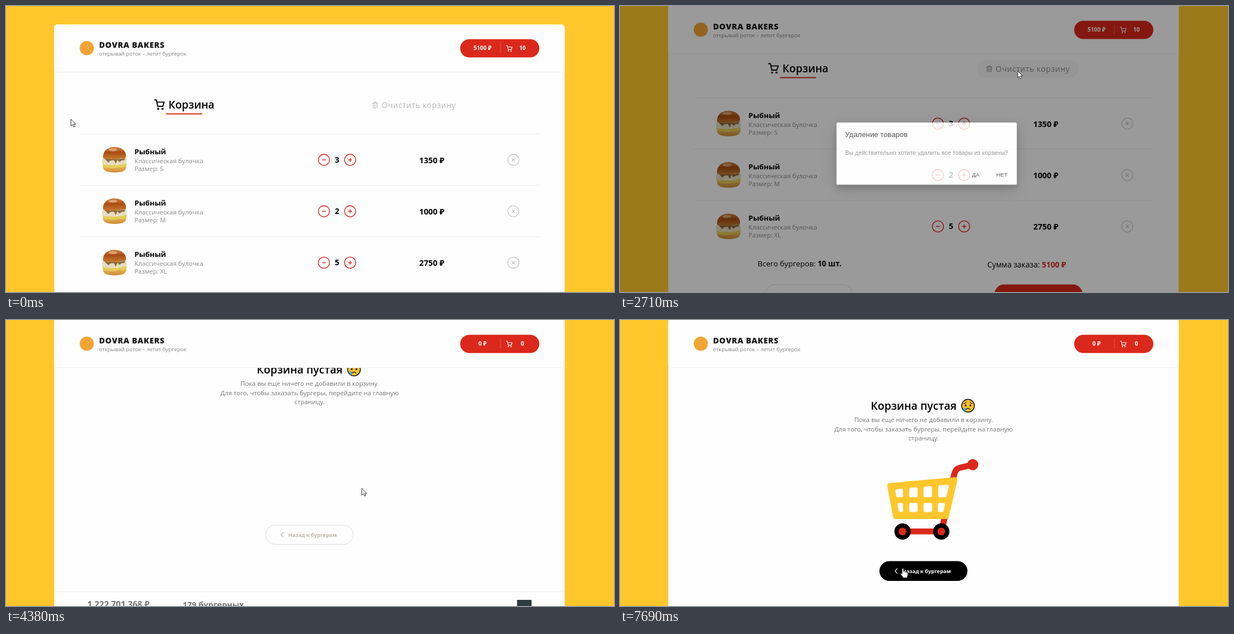
An HTML page that plays this animation: 1091 by 513 pixels, repeating every 8000 ms.

```html
<!DOCTYPE html>
<html lang="ru">
<head>
<meta charset="utf-8">
<style>
  html, body { margin: 0; width: 100%; height: 100%; overflow: hidden; background: #ffc72c; }
  svg { display: block; width: 1091px; height: 513px; font-family: "Open Sans", "Noto Sans", sans-serif; }
  text { white-space: pre; }
  .b { font-weight: 700; }
  .mid { text-anchor: middle; }
  .line { fill: none; stroke-linecap: round; stroke-linejoin: round; }
  #dialog { font-family: "Liberation Sans", Arial, sans-serif; }
  #panel { filter: drop-shadow(0 7px 5px rgba(0,0,0,.2)) drop-shadow(0 6px 15px rgba(0,0,0,.22)); }
</style>
</head>
<body>
<svg id="stage" viewBox="0 0 1091 513"></svg>
<script>
const RED = '#da291c', YELLOW = '#ffc72c', PAPER = '#fefefe';
const $ = id => document.getElementById(id);

// Drawing helpers
const text = (x, y, size, fill, str, cls = '', extra = '') =>
  `<text x="${x}" y="${y}" font-size="${size}" fill="${fill}" class="${cls}" ${extra}>${str}</text>`;
const rect = (x, y, w, h, r, fill, extra = '') =>
  `<rect x="${x}" y="${y}" width="${w}" height="${h}" rx="${r}" fill="${fill}" ${extra}/>`;
const disc = (x, y, r, fill, extra = '') => `<circle cx="${x}" cy="${y}" r="${r}" fill="${fill}" ${extra}/>`;
const line = (d, color, width, extra = '') =>
  `<path class="line" d="${d}" stroke="${color}" stroke-width="${width}" ${extra}/>`;
const group = (x, y, body, extra = '') => `<g transform="translate(${x} ${y})" ${extra}>${body}</g>`;

const trolley = (x, y, scale, color) => `<g transform="translate(${x} ${y}) scale(${scale})">
  ${line('M1 1h3.3l2.4 11.2h8.9L18 4.8H5.2', color, 1.9)}
  ${disc(7.5, 16.5, 1.8, color)}${disc(15, 16.5, 1.8, color)}</g>`;

const burger = `
  <path d="M2 34Q22 40 44 33Q45 42 37 45Q23 48.500 9 45Q1 42 2 34Z" fill="url(#base)"/>
  <path d="M1 31Q22 36 45 30L43 36Q36 39 30 37Q20 41 12 38Q5 39 2 36Z" fill="#e3cd58"/>
  <path d="M2 20Q22 17 43 19L45 27Q42 33 36 31Q31 35 26 31Q20 36 14 32Q7 35 1 31Q-1 26 2 20Z" fill="#e6dcc0"/>
  <path d="M4 21Q22 24 42 21L40 25Q36 23 32 28L28 24 25 31 22 25Q14 24 12 29L8 25Z" fill="#8a6a3c"/>
  <path d="M2 19Q2 9 10 4Q22-2 35 3.500Q44 9 43.500 18Q42 22 36 21Q23 24 9 22Q3 23 2 19Z" fill="url(#bun)"/>
  <ellipse cx="20" cy="6" rx="8" ry="2.500" fill="#f0bd8c" opacity=".7"/>`;

const stepper = (x, d) => disc(x, 211, 10, 'none', `stroke="${RED}" stroke-width="1.4"`) + line(d, RED, 1.5);

const row = ([size, count, price], i) => group(0, i * 92.2, `
  ${rect(132, 164, 825, 1, 0, '#ededed')}
  ${group(172, 187, burger)}
  ${text(230.5, 201, 13.1, '#000', 'Рыбный', 'b')}
  ${text(230.5, 216.5, 11.45, '#8a8a8a', 'Классическая булочка')}
  ${text(230.5, 231, 11.3, '#8a8a8a', 'Размер: ' + size)}
  ${stepper(570.5, 'M567.5 211h6')}
  ${text(594, 216, 14, '#000', count, 'b mid')}
  ${stepper(617.5, 'M614.5 211h6M617.5 208v6')}
  ${text(764, 216.8, 14.3, '#000', price + ' ₽', 'b mid')}
  ${disc(910.5, 211, 10, 'none', 'stroke="#cacaca" stroke-width="1.3"')}
  ${line('M908.3 208.8l4.4 4.4m0-4.4l-4.4 4.4', '#bbb', 1.3)}`);

const backButton = (x, y, fill, border, ink, extra) => group(x, y, `
  ${rect(0.5, 0.5, 157, 34.5, 17.2, fill, `stroke="${border}"`)}
  ${line('M32 13.500l-4 4.300 4 4.300', ink, 1.2)}
  ${text(41, 21.2, 9.4, ink, 'Назад к бургерам', 'b')}`, extra);

const orderPage = `
  ${trolley(265.500, 102.5, 1.02, '#000')}
  ${text(291.5, 119, 19.2, '#000', 'Корзина', '', 'font-weight="600"')}
  ${rect(287, 127.4, 65, 2, 1, RED)}
  ${rect(640, 97, 184, 31, 15.5, '#f5f5f5', 'id="clearBg"')}
  <g id="clear">
    ${line('M657.8 109.500h9.600M660.500 109v-1.600h4.200V109M658.800 109.700v8h7.600v-8M661.300 112v3.500M664 112v3.500', 'currentColor', 1)}
    ${text(674, 117.5, 14, 'currentColor', 'Очистить корзину', '', 'letter-spacing=".55"')}
  </g>
  ${[['S', 3, 1350], ['M', 2, 1000], ['XL', 5, 2750]].map(row).join('')}
  ${text(247, 467, 13.5, '#000', 'Всего бургеров: <tspan class="b">10 шт.</tspan>')}
  ${text(659, 469, 13.8, '#000', `Сумма заказа: <tspan class="b" fill="${RED}">5100 ₽</tspan>`)}
  ${backButton(260, 499.5, PAPER, '#dedede', '#b8b5b0')}
  ${rect(672, 499.5, 158, 35, 17.5, RED)}`;

const sadFace = group(624.5, 153.8, `
  ${disc(0, 0, 11.4, '#fcbf2d', 'stroke="#111" stroke-width="1.6"')}
  ${disc(-4.2, -0.5, 1.7, '#222')}${disc(4.2, -0.5, 1.7, '#222')}
  ${line('M-7.500-3.800Q-5-4.200-3.500-6.500M7.500-3.800Q5-4.200 3.500-6.500M-3.500 6.500Q0 2.500 3.500 6.500', '#222', 1.3)}
  <path d="M-5.500 2.500Q-9 7-7.800 9Q-5.500 11-3.600 9Q-2.800 7-5.500 2.500Z" fill="#27a9e1"/>`);

const bigCart = `
  ${line('M577 379L600 276Q602 267 610 265L633 259.500', RED, 11)}
  ${disc(633, 259.5, 10, RED)}
  ${rect(507, 374, 70, 10.5, 0, RED)}
  <path class="line" d="M484 297L601 286.500L585.500 352.500H494.500Z" style="fill:${YELLOW}" stroke="${YELLOW}" stroke-width="9"/>
  <g fill="${PAPER}" stroke="${PAPER}" stroke-width="6" stroke-linejoin="round">
    <path d="M497 306.500L505 305.500V315H498.500ZM522 304L531 303V315H522ZM547.500 302L557 301V315H547.500ZM574 299.500L587 298.500L583 315H574Z"/>
    <path d="M501 331H505V341.500H503ZM522 331H531V341.500H522ZM547.500 331H557V341.500H547.500ZM573.500 331H580L578 341.500H573.500Z"/>
  </g>
  ${[507, 576.5].map(x => disc(x, 379.4, 14.6, '#000') + disc(x, 379.4, 6.8, RED)).join('')}`;

const emptyPage = `
  ${text(527, 161, 19.5, '#000', 'Корзина пустая', 'mid', 'font-weight="600"')}
  ${sadFace}
  ${['Пока вы еще ничего не добавили в корзину.',
     'Для того, чтобы заказать бургеры, перейдите на главную',
     'страницу.'].map((s, i) => text(544.7, 183 + i * 16.7, 11.45, '#777', s, 'mid')).join('')}
  <g id="bigCart">${bigCart}</g>
  ${backButton(465.5, 432.5, PAPER, '#dcdcdc', '#b8b2aa')}
  ${backButton(465.5, 432.5, '#000', '#000', '#fff', 'id="backHover"')}
  ${rect(87, 552, 916, 1, 0, '#ececec')}
  ${text(146, 581, 15.2, '#777', '1 222 701 368 ₽', 'b')}
  ${text(317, 581, 14.5, '#777', '179 бургерных', 'b')}
  ${rect(917, 567, 26, 26, 0, '#2c3c3f')}`;

const header = `
  ${rect(86.5, 0, 916, 86, 6, PAPER)}
  ${rect(92, 85, 906, 1, 0, '#efefef')}
  ${disc(145, 42.5, 12.7, '#f2a534')}
  ${text(167, 41.5, 14.3, '#181818', 'DOVRA BAKERS', '', 'font-weight="800" letter-spacing=".6"')}
  ${text(167, 55.5, 9.7, '#838383', 'открывай роток – летит бургерок')}
  ${rect(815, 26.4, 142, 32.8, 16.4, RED)}
  ${text(855, 46, 10.2, '#fff', '', 'b mid', 'id="total"')}
  ${rect(886.5, 34, 1, 17, 0, '#fff', 'opacity=".25"')}
  ${trolley(897, 37.500, 0.62, '#fff')}
  ${text(926.7, 46, 10.2, '#fff', '', 'b mid', 'id="count"')}`;

const dialog = `
  ${rect(0, 0, 1091, 513, 0, '#000', 'opacity=".5"')}
  ${rect(388.5, 209, 323.5, 111.5, 2.6, '#fefefe', 'id="panel"')}
  ${text(404, 234.5, 13, '#212121', 'Удаление товаров', '', 'letter-spacing=".1"')}
  ${text(404, 267.2, 10.4, '#7b7b7b', 'Вы действительно хотите удалить все товары из корзины?', '', 'letter-spacing=".15"')}
  ${text(638.5, 305.6, 9.6, '#212121', 'ДА', 'mid', 'letter-spacing=".3"')}
  ${text(685.3, 305.6, 9.6, '#212121', 'НЕТ', 'mid', 'letter-spacing=".3"')}`;

const pointer = `<g id="cursor" fill="#fff" stroke="#222" stroke-width=".9" stroke-linejoin="round">
  <path id="arrow" d="M0 0V12.300L2.900 9.700L4.900 14L6.900 13.100L5 9H8.800Z"/>
  <path id="hand" d="M-1.400 1.500Q0-.6 1.400 1.500V6.300Q3.300 5.300 4 7Q5.800 6.200 6.500 7.800Q8.600 7 9 9V12.500Q8.600 15 7.300 17.300H.500Q-1 14-3.600 11.500Q-4.600 9-2.600 9.300L-1.400 10.500Z"/>
</g>`;

$('stage').innerHTML = `
  <defs>
    <linearGradient id="bun" x2="0" y2="1">
      <stop stop-color="#cf8446"/><stop offset=".45" stop-color="#a94c14"/><stop offset="1" stop-color="#c67a30"/>
    </linearGradient>
    <linearGradient id="base" x2="0" y2="1">
      <stop stop-color="#e8c163"/><stop offset="1" stop-color="#cf8a35"/>
    </linearGradient>
  </defs>
  ${rect(0, 0, 1091, 513, 0, YELLOW)}
  ${rect(86.5, 33, 916, 700, 6, PAPER, 'id="card"')}
  <g id="order">${orderPage}</g>
  <g id="empty">${emptyPage}</g>
  <g id="header">${header}</g>
  <g id="dialog">${dialog}</g>
  ${pointer}`;

// Motion
const ramp = (t, a, b) => Math.min(1, Math.max(0, (t - a) / (b - a)));
const smooth = u => u * u * (3 - 2 * u);
const easeIn = u => u ** 1.6;
const easeOut = u => Math.sin(u * Math.PI / 2);
const between = (t, a, b) => t >= a && t < b;

// Each stop: time, x, y, easing used on the way to it
const path = [
  [730, 116.5, 203], [880, 190.5, 185, easeIn], [1510, 710, 118.5, easeOut], [1700, 713.5, 116.5, smooth],
  [3080, 713.5, 116.5], [3870, 639, 303, smooth], [3950, 638.5, 302, smooth],
  [4790, 638.5, 302], [5070, 679, 280.5, smooth],
  [6650, 679, 280.5], [6790, 673, 274, smooth], [7440, 516, 426, smooth], [7610, 507.5, 445, easeOut]
];

function cursorAt(t) {
  const i = path.findIndex(p => p[0] > t);
  if (i === 0) return path[0].slice(1, 3);
  if (i < 0) return path[path.length - 1].slice(1, 3);
  const [t0, x0, y0] = path[i - 1], [t1, x1, y1, ease = smooth] = path[i];
  const u = ease(ramp(t, t0, t1));
  return [x0 + (x1 - x0) * u, y0 + (y1 - y0) * u];
}

const move = (id, x, y) => $(id).setAttribute('transform', `translate(${x} ${y})`);
const fade = (id, value) => {
  $(id).style.opacity = value;
  $(id).style.display = value > 0 ? '' : 'none';
};

function render(t) {
  const scroll = 65 * smooth(ramp(t, 350, 580));
  const cleared = t >= 4310;
  move('card', 0, -scroll);
  move('order', 0, 65 - scroll);
  move('header', 0, Math.max(0, 33 - scroll));
  move('empty', 0, -65 * (1 - smooth(ramp(t, 5310, 5560))));
  fade('order', +!cleared);
  fade('empty', +cleared);
  fade('bigCart', +(t >= 4760));
  $('total').textContent = cleared ? '0 ₽' : '5100 ₽';
  $('count').textContent = cleared ? '0' : '10';

  const hover = ramp(t, 1530, 1720);
  const grey = 182 - 140 * hover * (1 - ramp(t, 2560, 2780));
  $('clear').style.color = `rgb(${grey},${grey},${grey})`;
  fade('clearBg', hover * (1 - ramp(t, 2790, 2890)));
  fade('backHover', ramp(t, 7460, 7660));
  fade('dialog', smooth(ramp(t, 2530, 2790)) * (1 - ramp(t, 4290, 4375)));

  const hand = between(t, 1970, 2600) || between(t, 3900, 4310) || t >= 7480;
  fade('hand', +hand);
  fade('arrow', +!hand);
  move('cursor', ...cursorAt(t));
}

function tick() {
  render(performance.now() % 8000);
  requestAnimationFrame(tick);
}
tick();
</script>
</body>
</html>
```
